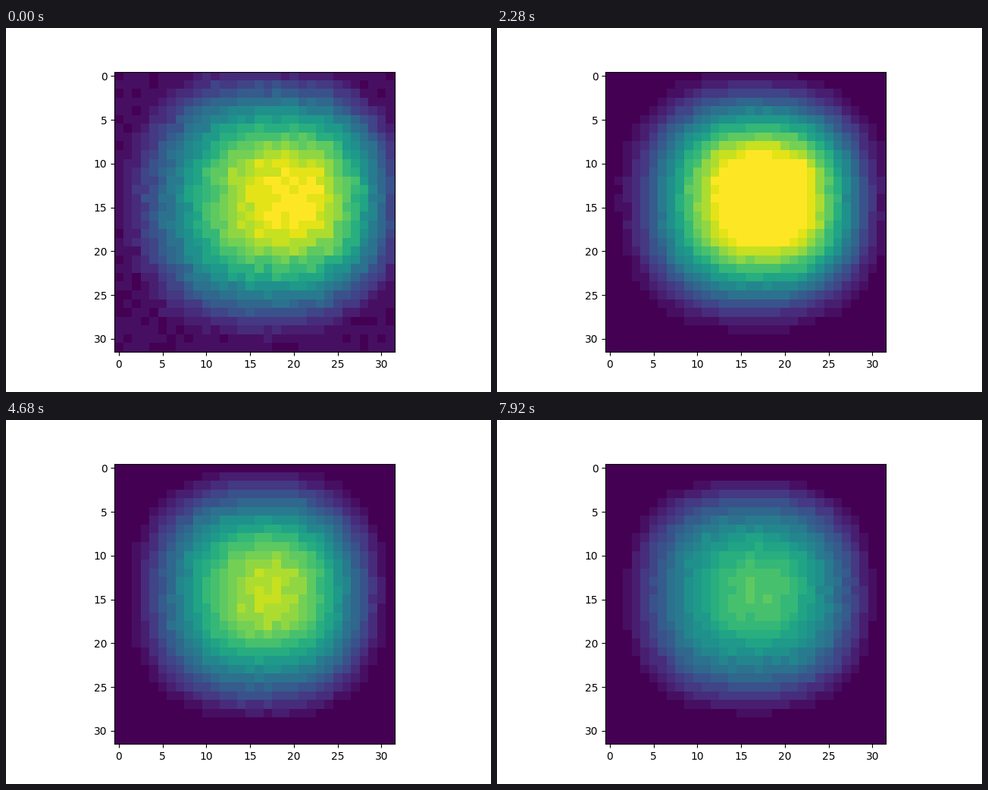
These frames come from a looping animation (640x480 px, 8 s). A matplotlib script:

```python
import numpy as np
import matplotlib.pyplot as plt
from matplotlib.animation import FuncAnimation

N = 32            # cells per side
LEVELS = 24       # brightness steps up to saturation
TICK = 40         # ms per animation frame
HOLD = 3          # frames each reading stays on screen
FRAMES = 200
SQUARENESS = 2.45  # exponent of the superellipse contours

Y, X = np.mgrid[0:N, 0:N].astype(float)
FIXED = np.random.default_rng(7).normal(size=(N, N))


def settle(t, start, end, tau):
    """Exponential approach from start to end."""
    return end + (start - end) * np.exp(-t / tau)


def contour(cx, cy, left, right, up, down):
    """Relative radius on nested superellipses with a drifting centre."""
    rx, ry = (left + right) / 2, (up + down) / 2
    u, v = (X - cx) / rx, (Y - cy) / ry
    du, dv = (right - left) / 2 / rx, (down - up) / 2 / ry
    q = np.full_like(X, 0.5)
    for _ in range(6):
        q = (abs(u - du * q) ** SQUARENESS
             + abs(v - dv * q) ** SQUARENESS) ** (1 / SQUARENESS)
    return q


def beam(step):
    t = step * HOLD * TICK / 1000
    noise = np.random.default_rng(100 + step).normal(size=(N, N))

    # A quick rise, then a slow fade; the spot shrinks and recentres.
    peak = settle(t, 1.89, 0.64, 3.0) * settle(t, 0.53, 1, 0.25)
    power = 0.35 + 1.25 * peak
    q = contour(cx=settle(t, 20, 17.2, 2.0), cy=14.1,
                left=settle(t, 20.7, 15.4, 3.5), right=11.6 + 2.4 * peak,
                up=16.3 - 0.36 * t, down=16.6 - 0.28 * t)
    light = peak * np.clip(1 - q**2, 0, None) ** power

    base = settle(t, 0.025, 0, 0.3) * (1 + 0.4 * noise)
    grain = (0.25 * FIXED + 0.3 * noise) * np.sqrt(light)
    return np.clip(np.round(LEVELS * (light + base) + grain), 0, LEVELS)


fig, ax = plt.subplots(figsize=(6.4, 4.8), dpi=100)
image = ax.imshow(beam(0), cmap="viridis", vmin=0, vmax=LEVELS,
                  interpolation="nearest")


def update(frame):
    image.set_data(beam(frame // HOLD))
    return [image]


anim = FuncAnimation(fig, update, frames=FRAMES, interval=TICK,
                     repeat=True, repeat_delay=0)
plt.show()
```
